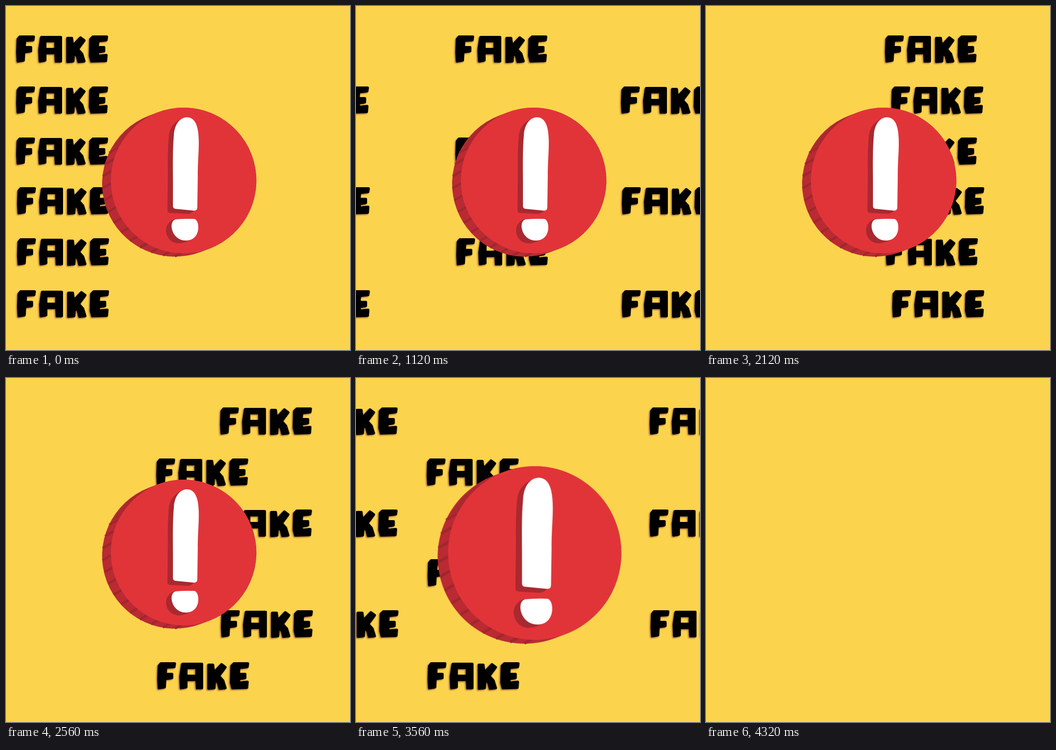
Write an HTML page that moves like this. It is 748 px wide and 748 px high and loops after 5820 ms.

```html
<!DOCTYPE html>
<html lang="en">
<head>
<meta charset="utf-8">
<title>Fake alert</title>
<style>
  html, body { margin: 0; width: 100%; height: 100%; overflow: hidden; background: #fcd34d; }
  svg { display: block; width: 100%; height: 100%; }
  .word { fill: #000; stroke: #000; stroke-width: 6; stroke-linejoin: round; fill-rule: evenodd; }
  .row { filter: drop-shadow(-2px 2px 1.5px rgba(100, 35, 45, .6)); }
  .rim { stroke: #ba2a33; stroke-width: 317; stroke-linecap: round; }
  .groove { fill: none; stroke: #9f272e; stroke-width: 5; }
  .shade { fill: #a8292f; }
  .mark { fill: #fff; }
</style>
</head>
<body>
<svg viewBox="0 0 748 748" role="img" aria-label="FAKE">
  <defs>
    <g id="word" class="word">
      <path d="M26 72L30 67L60 67L59 74L41 75L40 90L54 90L54 98L39 100L38 118L26 120L25 100Z"/>
      <path d="M77 68L119 68L119 120L109 120L108 102L85 102L85 118L74 120L73 95ZM85 76L85 94L108 94L108 76Z"/>
      <path d="M134 70L143 70L145 87L162 69L170 75L156 94L165 104L170 120L158 121L155 109L147 101L146 120L134 121Z"/>
      <path d="M184 72L189 67L219 67L218 74L200 76L199 90L213 90L213 98L199 100L200 109L218 107L217 119L186 120L183 108Z"/>
    </g>
  </defs>
  <g id="scene">
    <g id="rows"></g>
    <g id="badge">
      <path class="rim" d="M367.5 386.5L386 379.5"/>
      <path class="groove" id="grooves"/>
      <path class="shade" d="M322 235Q266 254 233 307L248 306Q276 255 328 235Z"/>
      <ellipse cx="386" cy="379.5" rx="158" ry="158.5" fill="#e13439"/>
      <path class="shade" d="M390 243C370 247 356 262 354 283Q351 318 352 360L351 444Q351 450 358 450L396 452Q405 451 410 443Z"/>
      <path class="shade" d="M368 463C355 467 347 477 348 490C350 507 362 517 378 516Q390 515 399 509Z"/>
      <path class="mark" d="M393 242C376 243 366 260 365 281C362 312 363 350 363 382L363 435Q363 440 368 441L409 445Q416 445 416 438L417 370C417 335 420 314 419 288C418 260 411 242 393 242Z"/>
      <path class="mark" d="M368 464Q389 462 410 463C416 465 419 475 418 485C416 501 406 510 391 510C374 510 361 497 360 479Q360 467 368 464Z"/>
    </g>
  </g>
</svg>
<script>
const STAGE = 748, LOOP = 5820, ACTIVE = 4320, STEP = 40;
const BEAT = 551;
// [ms within a beat, scale]
const PULSE = [[0, 1], [49, 1], [86, 1.25], [222, 1.25], [343, 1.027], [356, 1], [BEAT, 1]];
// [x, y, direction]
const ROWS = [[0, 0, 1], [0, 111, -1], [0, 222, 1], [2, 330, -1], [2, 441, 1], [2, 554, -1]];
const byId = id => document.getElementById(id);

function svgNode(name, attrs, parent) {
  const node = document.createElementNS('http://www.w3.org/2000/svg', name);
  for (const key in attrs) node.setAttribute(key, attrs[key]);
  return parent.appendChild(node);
}

// Each row holds two copies one stage apart, so it wraps around the edges.
const rows = ROWS.map(([x, y, dir]) => {
  const node = svgNode('g', { class: 'row' }, byId('rows'));
  for (const shift of [0, -dir * STAGE]) svgNode('use', { href: '#word', x: shift }, node);
  return { node, x, y, dir };
});

let grooves = '';
for (let i = 0; i < 13; i++) {
  const angle = (90 + i * 9.6) * Math.PI / 180;
  const x = 367.5 + 158 * Math.cos(angle), y = 386.5 + 158 * Math.sin(angle);
  grooves += `M${x.toFixed(1)} ${y.toFixed(1)}l19 -11`;
}
byId('grooves').setAttribute('d', grooves);

function pulseAt(time) {
  const phase = time % BEAT;
  const i = PULSE.findIndex(([end]) => end > phase);
  const [t0, s0] = PULSE[i - 1], [t1, s1] = PULSE[i];
  return s0 + (s1 - s0) * (phase - t0) / (t1 - t0);
}

function draw(time) {
  const active = time < ACTIVE;
  byId('scene').style.display = active ? '' : 'none';
  if (!active) return;
  const travel = STAGE * time / ACTIVE;
  for (const { node, x, y, dir } of rows) {
    node.setAttribute('transform', `translate(${x + dir * travel} ${y})`);
  }
  byId('badge').setAttribute('transform',
    `translate(374 374) scale(${pulseAt(time)}) translate(-374 -374)`);
}

const start = performance.now();
function tick() {
  const time = (performance.now() - start) % LOOP;
  draw(Math.floor(time / STEP) * STEP);
  requestAnimationFrame(tick);
}
tick();
</script>
</body>
</html>
```
